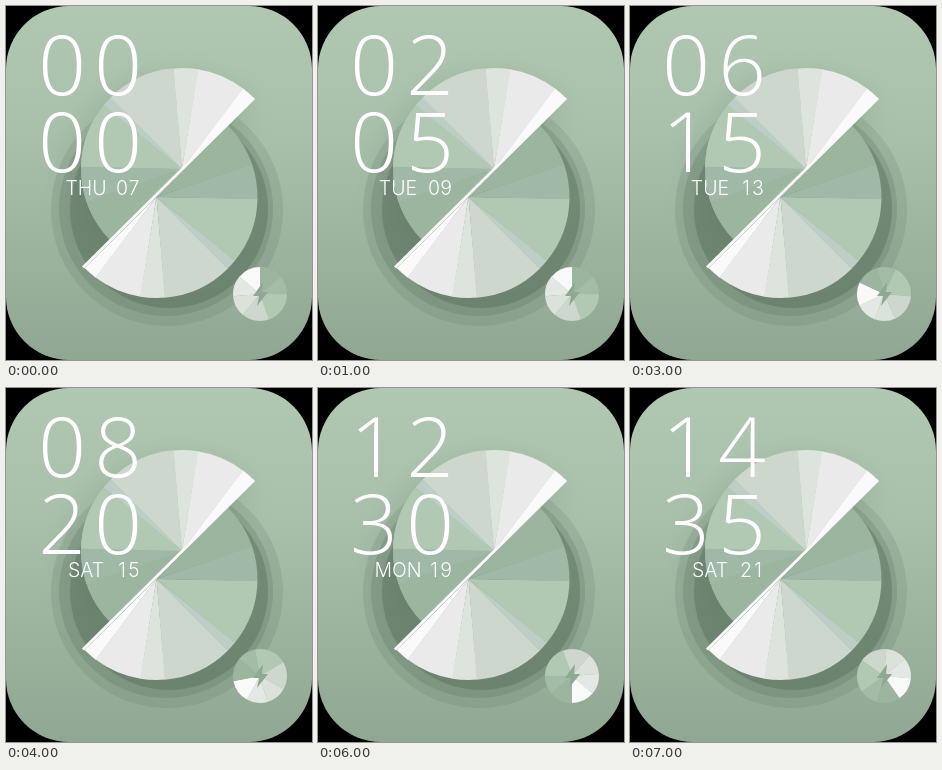
An HTML page with a canvas for the animation above (8 s loop, 306 px wide and 354 px high).

```html
<!DOCTYPE html>
<html lang="en">
<head>
<meta charset="utf-8">
<style>
  html, body { margin: 0; width: 100%; height: 100%; overflow: hidden; background: #000; }
  canvas { display: block; }
</style>
</head>
<body>
<canvas id="stage" width="306" height="354"></canvas>
<script>
const ctx = document.getElementById('stage').getContext('2d');
const STEP = 1000, STEPS = 8;
const DAYS = ['THU', 'TUE', 'THU', 'TUE', 'SAT', 'THU', 'MON', 'SAT'];
const DIAL = [0, 0, 36, 65, 101, 148, 180, 215];
const RADIUS = 101;
const UPPER = { x: 176, y: 163 }, LOWER = { x: 150.5, y: 191 };
const rad = deg => deg * Math.PI / 180;
const two = n => String(n).padStart(2, '0');

// Fans run anticlockwise from a start angle; each slice is [width, colour].
const DISC_FAN = [[8, '#fafafa'], [28, '#e9eae9'], [14, '#dde4dd'], [40, '#cdd7ce'],
                  [6, '#bccec5'], [38, '#b1c8b3'], [20, '#9fb9a6'], [26, '#9cb59f']];
const DIAL_FAN = [[50, '#f8f9f8'], [45, '#e4e8e4'], [45, '#dae2da'], [60, '#cdd7ce'],
                  [70, '#b1c8b3'], [40, '#a3bca7'], [50, '#9cb59f']];

function fan(center, radius, start, slices) {
  let angle = start;
  for (const [width, color] of slices) {
    ctx.beginPath();
    ctx.moveTo(center.x, center.y);
    ctx.arc(center.x, center.y, radius, rad(angle + 0.3), rad(angle - width), true);
    ctx.closePath();
    ctx.fillStyle = color;
    ctx.fill();
    angle -= width;
  }
}

function disk(x, y, radius, color) {
  ctx.beginPath();
  ctx.arc(x, y, radius, 0, 2 * Math.PI);
  ctx.fillStyle = color;
  ctx.fill();
}

function background() {
  const shade = ctx.createLinearGradient(0, 0, 0, 354);
  shade.addColorStop(0, '#b0c8b2');
  shade.addColorStop(0.35, '#a9c1ab');
  shade.addColorStop(0.7, '#9bb39d');
  shade.addColorStop(1, '#90a893');
  ctx.fillStyle = shade;
  ctx.fillRect(0, 0, 306, 354);
}

function upperShadow() {
  ctx.save();
  ctx.shadowColor = 'rgba(70,95,76,.25)';
  ctx.shadowBlur = 40;
  ctx.shadowOffsetX = -6;
  ctx.shadowOffsetY = 14;
  ctx.beginPath();
  ctx.arc(UPPER.x, UPPER.y, RADIUS, rad(-45), rad(-225), true);
  ctx.fillStyle = '#9cb59f';
  ctx.fill();
  ctx.restore();
}

function lowerShadow() {
  disk(161, 204, 116, 'rgba(61,84,66,.12)');
  disk(160, 203, 107, 'rgba(61,84,66,.17)');
  disk(163, 203, 99, 'rgba(61,84,66,.28)');
}

function discs() {
  lowerShadow();
  upperShadow();
  fan(UPPER, RADIUS, -45, DISC_FAN);
  fan(LOWER, RADIUS, 135, DISC_FAN);
  ctx.beginPath();
  ctx.moveTo(248, 92);
  ctx.lineTo(77, 261.5);
  ctx.strokeStyle = '#fafafa';
  ctx.lineWidth = 3;
  ctx.stroke();
}

function dial(turn) {
  const center = { x: 254, y: 288 };
  fan(center, 27, -90 - turn, DIAL_FAN);
  ctx.beginPath();
  [[257, 276], [247, 290], [253, 290], [251, 300], [262, 286], [256, 286]]
    .forEach(([x, y]) => ctx.lineTo(x, y));
  ctx.closePath();
  ctx.fillStyle = '#8ea892';
  ctx.fill();
}

function digits(value, x, pitch, baseline) {
  [...two(value)].forEach((digit, i) => ctx.fillText(digit, x + pitch * i, baseline));
}

function clock(step) {
  ctx.fillStyle = '#fff';
  ctx.textAlign = 'center';
  ctx.font = '300 83.5px "Open Sans", sans-serif';
  digits(step * 2, 56, 56, 88.5);
  digits(step * 5, 56, 56, 165.5);
  ctx.font = '300 19.5px Inter, sans-serif';
  ctx.fillText(DAYS[step], 80, 188.5);
  digits(7 + step * 2, 116, 12, 188.5);
}

function draw(now) {
  const step = Math.floor(now / STEP) % STEPS;
  ctx.clearRect(0, 0, 306, 354);
  ctx.save();
  ctx.beginPath();
  ctx.roundRect(0, 0, 306, 354, 63);
  ctx.clip();
  background();
  discs();
  dial(DIAL[step]);
  clock(step);
  ctx.restore();
  requestAnimationFrame(draw);
}
requestAnimationFrame(draw);
</script>
</body>
</html>
```
